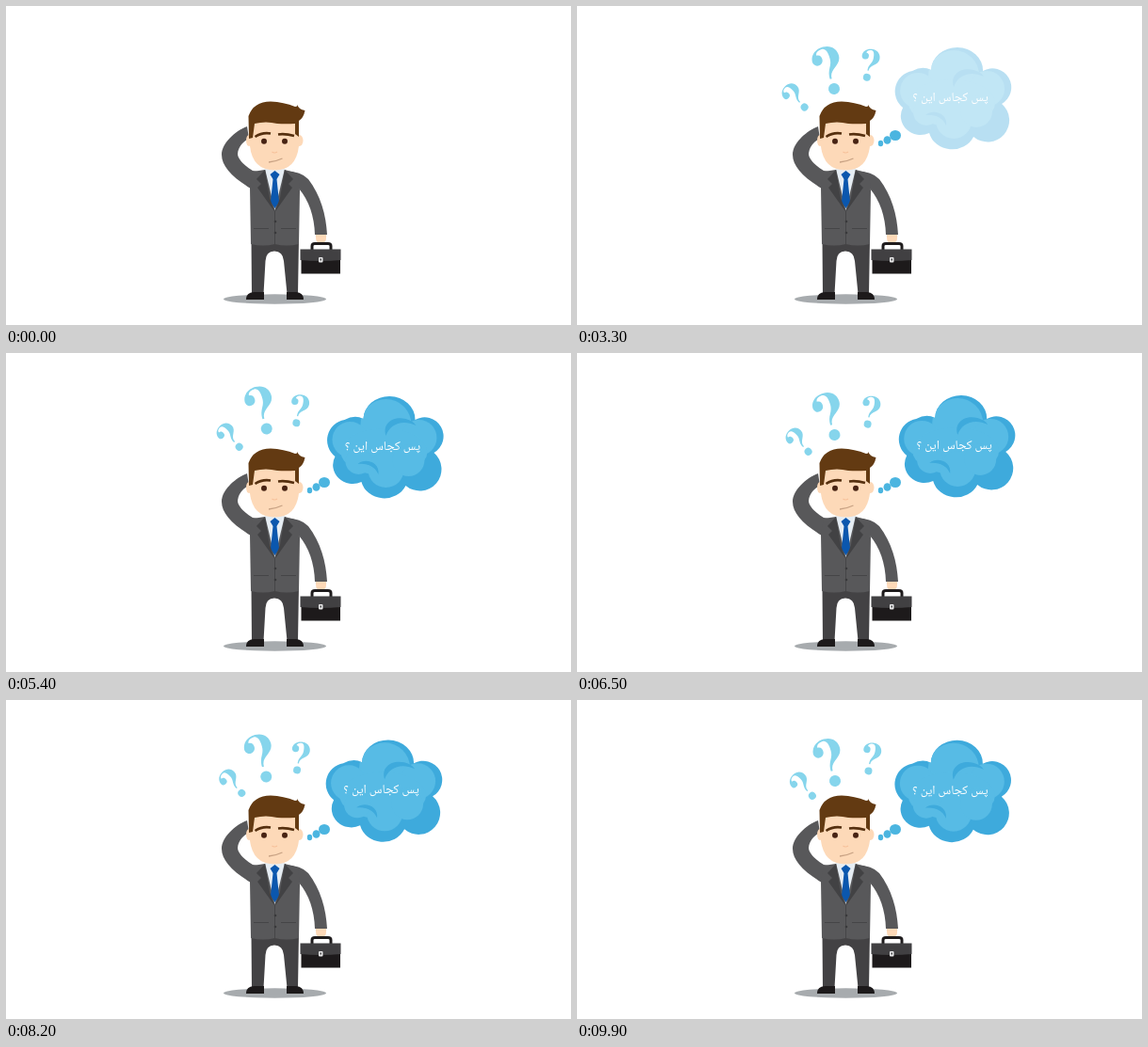
Animation, 600 px wide and 339 px high, one loop 10000 ms. Source, as an HTML page:

```html
<!DOCTYPE html>
<html lang="fa">
<head>
<meta charset="utf-8">
<style>
  html, body { margin: 0; width: 100%; height: 100%; overflow: hidden; background: #fff; }
  svg { display: block; width: 100vw; height: 100vh; }
  text { font: 13.5px "Noto Naskh Arabic", "DejaVu Sans", sans-serif; direction: rtl; }
</style>
</head>
<body>
<svg viewBox="0 0 600 339">
  <defs>
    <g id="mark" fill="#86d5ec">
      <path d="M-1.5-11C-2-22 4-23 4-32C4-40 2-44-2-44C-6-44-9-42-9-39C-5-39-4-36-4-34A5.5 5.5 0 0 1-15-33C-15-41-8-46 0-46C9-46 14-40 14-33C14-22 0-22 .5-11Z"/>
      <circle r="6"/>
    </g>
    <path id="puff" d="M380 69A27 24 0 0 1 435 70A20 20 0 0 1 455 105A20 20 0 0 1 425 140A25 23 0 0 1 378 136A21 20 0 0 1 350 109A22 22 0 0 1 360 70Q371 64 380 69Z"/>
    <clipPath id="inside"><use href="#puff"/></clipPath>
  </defs>

  <ellipse cx="285.500" cy="311.500" rx="54.500" ry="5.200" fill="#a7abae"/>
  <use href="#mark" class="mark"/>
  <use href="#mark" class="mark"/>
  <use href="#mark" class="mark"/>

  <g id="man">
    <!-- legs and shoes -->
    <path fill="#434244" d="M260.500 248H311L310 306H298.500L295 271Q294 260.500 285 260.500Q276 260.500 275.500 271L273.500 306H261Z"/>
    <path fill="#1d1a1b" d="M255 312Q255 304.500 263 304H274V312ZM316 312Q316 304.500 308 304H298V312Z"/>
    <!-- arms -->
    <path fill="#58585a" d="M256 128C243 133 229 146 229 158C229 170 240 182 260 194L268 176L262 175C252 169 246 162 246 157C247 149 252 144 258 141Z"/>
    <path fill="#fdd9b8" d="M329 241H340V247Q340 252 334 252Q329 252 329 246Z"/>
    <path fill="#58585a" d="M296 175Q314 176 321 184C334 201 340 222 341 243H328Q327 213 311 194Z"/>
    <!-- jacket -->
    <path fill="#58585a" d="M275 174L262 176L259 192L260 253Q273 256 285.500 253Q298 256 311 253L312 196L310 178L296 174Z"/>
    <path fill="#e6edf3" d="M275 173H296L285.500 217Z"/>
    <path fill="#0b57ae" d="M280.500 179L285.500 175L290.500 179L287.500 184L290 208L285.500 215L281 208L283.500 184Z"/>
    <path fill="#424244" d="M275 174L266 184L271 189L267 193L285.500 219L280 204ZM296 174L305 184L300 189L304 193L285.500 219L291 204Z"/>
    <path fill="none" stroke="#454547" d="M285.500 218V253M263 236.500H279M292 236.500H308"/>
    <g fill="#39393b"><circle cx="286" cy="229" r="1.300"/><circle cx="286" cy="241" r="1.300"/></g>
    <!-- briefcase -->
    <path fill="none" stroke="#1f1c1d" stroke-width="3" d="M325 260V255Q325 252.500 328 252.500H342Q345 252.500 345 255V260"/>
    <path fill="#1d1a1b" d="M313.500 264H355V284.500H313.500Z"/>
    <path fill="#414042" d="M312.500 258.500H355.500V270Q334 272 312.500 270Z"/>
    <rect x="332" y="267" width="4.500" height="5.500" rx="1" fill="#e7e7e8"/>
    <rect x="333.500" y="268.500" width="1.500" height="2" fill="#414042"/>
    <!-- head -->
    <g fill="#fdd9b8">
      <ellipse cx="311.500" cy="143" rx="4" ry="6"/>
      <ellipse cx="258" cy="143" rx="3" ry="6"/>
      <path d="M259 116H311V149Q308 174.500 285.500 174.500Q262 174.500 259 149Z"/>
    </g>
    <path fill="#633a12" d="M258 141L257.500 117Q263 101.500 281 101.500Q295 102 307 107Q310 107 309 104.500Q311 110 317.500 111Q316 119 311 122V139L307 136V125Q297 125.500 288 125Q276 122 264 125L262 140Z"/>
    <path fill="none" stroke="#56300f" stroke-width="2.700" d="M264.500 139Q272 134 281 135.500M289 136.500Q297 135.500 306 138"/>
    <g fill="#472313"><circle cx="274" cy="143.800" r="3"/><circle cx="296" cy="143.800" r="3"/></g>
    <path fill="none" stroke="#f6c09a" stroke-width="1.200" d="M282.500 155Q285 157 288 155"/>
    <path fill="none" stroke="#c8a284" stroke-width="1.300" d="M279 166Q286 165.500 293.500 162"/>
  </g>

  <g fill="#4bb5e0">
    <ellipse class="dot" cx="322.500" cy="146" rx="2.700" ry="3.200"/>
    <ellipse class="dot" cx="329.500" cy="142.500" rx="4" ry="4.300"/>
    <ellipse class="dot" cx="338" cy="137.500" rx="6" ry="5.500"/>
  </g>

  <g id="cloud">
    <use href="#puff" fill="#3eaadc"/>
    <g clip-path="url(#inside)">
      <g fill="#57bbe5">
        <circle cx="404" cy="75" r="27"/>
        <circle cx="366" cy="91" r="19"/>
        <circle cx="439" cy="89" r="19"/>
        <ellipse cx="402" cy="104" rx="46" ry="25"/>
        <circle cx="404" cy="123" r="19"/>
        <circle cx="428" cy="113" r="17"/>
        <circle cx="375" cy="114" r="14"/>
      </g>
      <path fill="#3eaadc" d="M404 87C400 74 411 66 425 69Q433 71 436 76C421 69 408 75 404 87ZM374 117C382 110 398 115 396 128C392 119 384 116 374 117Z"/>
    </g>
    <text x="400.500" y="102" text-anchor="middle" fill="#fff">پس کجاس این ؟</text>
  </g>
</svg>
<script>
const LOOP = 10, STEP = 0.1;
const all = selector => [...document.querySelectorAll(selector)];
const fade = (t, start, length) => Math.max(0, Math.min(1, (t - start) / length));
const ease = k => (1 - Math.cos(Math.PI * k)) / 2;
const wave = (t, peak, period) => Math.cos(2 * Math.PI * (t - peak) / period);

// Base place, slow drift per second (vx, vy) and sway (dx, dy).
const marks = [
  { x: 240, y: 106, vx: 1.1, vy: -0.6, dx: -2, dy: 3.5, scale: 0.66, angle: -42 },
  { x: 275, y: 84, vx: 0, vy: 0, dx: -2, dy: 4, scale: 1, angle: -15 },
  { x: 307, y: 75, vx: 0.25, vy: 0, dx: 0, dy: 0.8, scale: 0.66, angle: 12 }
];
const markEls = all(".mark"), dotEls = all(".dot"), cloud = document.getElementById("cloud");

function draw(now) {
  const t = Math.floor(now / 1000 / STEP) * STEP % LOOP;

  const sway = wave(t, 3.3, 3.6), rise = 36 * (1 - ease(fade(t, 0.3, 2)));
  marks.forEach((m, i) => {
    const x = m.x + m.vx * t + m.dx * sway;
    const y = m.y + m.vy * t + m.dy * sway + rise;
    markEls[i].setAttribute("transform", `translate(${x} ${y}) rotate(${m.angle}) scale(${m.scale})`);
    markEls[i].setAttribute("opacity", fade(t, 0.4, 2.3));
  });

  dotEls.forEach((dot, i) => dot.setAttribute("opacity", fade(t, 1.4 + i * 0.3, 0.5)));

  const x = -2 + 2.2 * wave(t, 6.4, 7.4), y = -1 + 2 * wave(t, 5.2, 7.4);
  cloud.setAttribute("transform", `translate(${x} ${y})`);
  cloud.setAttribute("opacity", fade(t, 2.5, 2.2));
  requestAnimationFrame(draw);
}
draw(performance.now());
</script>
</body>
</html>
```
